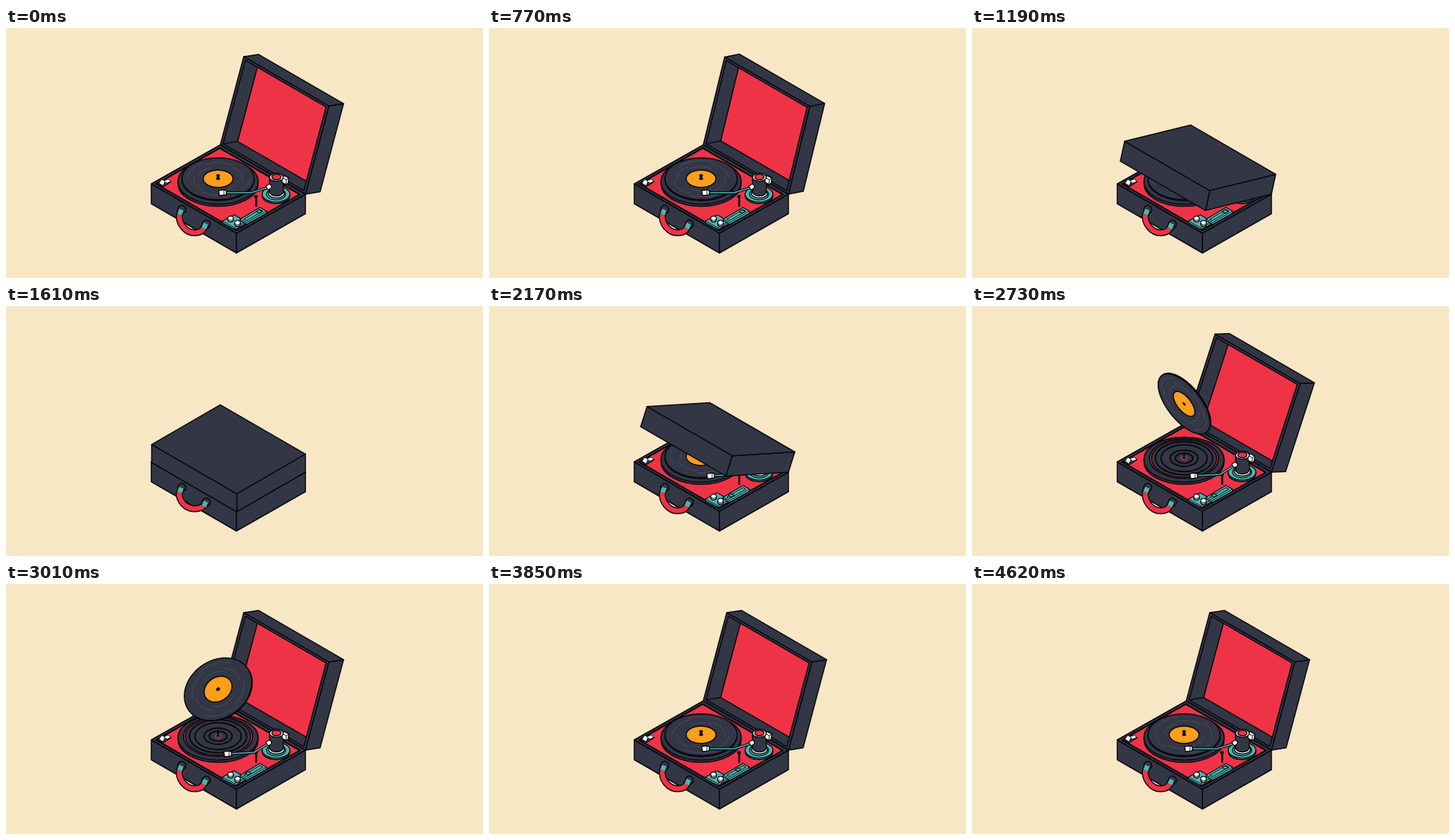
An HTML page with a canvas that plays this animation: 650x340 px, repeating every 4690 ms.

```html
<!DOCTYPE html>
<html lang="en">
<head>
<meta charset="utf-8">
<title>Record player</title>
<style>
html, body { margin: 0; width: 100%; height: 100%; overflow: hidden; background: #f8e7c5; }
canvas { display: block; }
</style>
</head>
<body>
<canvas id="stage" width="650" height="340"></canvas>
<script>
const ctx = document.getElementById('stage').getContext('2d');
const LOOP = 4690, STEP = 70, TAU = Math.PI * 2;
const BG = '#f8e7c5', DARK = '#333745', RED = '#ef3347', TEAL = '#4fb5ae',
      ORANGE = '#fb9f1c', INK = '#08080f', WHITE = '#fffdf8', GROOVE = '#555571';

const part = (t, a, b) => Math.min(1, Math.max(0, (t - a) / (b - a)));
const smooth = p => p * p * (3 - 2 * p);
const mix = (a, b, p) => a + (b - a) * p;
const add = (a, b, k = 1) => [a[0] + b[0] * k, a[1] + b[1] * k];

function paint(fill, width = 1.5, ink = INK) {
  if (fill) { ctx.fillStyle = fill; ctx.fill(); }
  if (width) { ctx.strokeStyle = ink; ctx.lineWidth = width; ctx.stroke(); }
}
function trace(points, close = true) {
  ctx.beginPath();
  points.forEach(p => ctx.lineTo(p[0], p[1]));
  if (close) ctx.closePath();
}
function poly(points, fill, width) { trace(points); paint(fill, width); }
function line(points, width, ink = INK) { trace(points, false); paint(null, width, ink); }
function oval(x, y, rx, ry, fill, width, ink) {
  ctx.beginPath();
  ctx.ellipse(x, y, rx, ry, 0, 0, TAU);
  paint(fill, width, ink);
}
function cylinder(x, top, bottom, rx, ry, fill) {
  ctx.beginPath();
  ctx.ellipse(x, top, rx, ry, 0, Math.PI, TAU);
  ctx.ellipse(x, bottom, rx, ry, 0, 0, Math.PI);
  ctx.closePath();
  paint(fill);
}

// Isometric case: u runs along the front-left side, v towards the hinge.
const U = [116, 67], V = [94, -53];
const at = (u, v, z = 0) => [198 + U[0] * u + V[0] * v, 212 + U[1] * u + V[1] * v - z];
const hinge = at(0, 1);

function lidAngle(t) {
  if (t < 1220) return 110 * (1 - part(t, 600, 1220) ** 3.17);
  if (t < 2113) {
    return 5 * Math.sin(Math.PI * part(t, 1220, 1450)) + 1.5 * Math.sin(Math.PI * part(t, 1450, 1600));
  }
  const p = part(t, 2113, 2450);
  return 125 * p * (1 + p - p * p) - 15 * smooth(part(t, 2450, 2900));
}

function drawLid(degrees) {
  const a = degrees * Math.PI / 180, c = Math.cos(a), s = Math.sin(a);
  const reach = [-93.5 * c, 54 * c - 108 * s];
  const depth = [21.3 * s, -12.3 * s - 24.6 * c];
  const spot = (u, r, d) => add(add(add(hinge, U, u), reach, r), depth, d);
  const sheet = (m, d) => [spot(m, m, d), spot(1 - m, m, d), spot(1 - m, 1 - m, d), spot(m, 1 - m, d)];
  poly([spot(1, 0, 0), spot(1, 1, 0), spot(1, 1, 1), spot(1, 0, 1)], DARK);
  poly([spot(0, 1, 0), spot(1, 1, 0), spot(1, 1, 1), spot(0, 1, 1)], DARK);
  if (degrees < 45) {
    poly(sheet(0, 1), DARK);
    return;
  }
  poly(sheet(0, 0), DARK);
  const opening = sheet(0.026, 0), panel = sheet(0.034, 0.93);
  ctx.save();
  trace(opening);
  ctx.clip();
  poly(panel, RED);
  line([opening[0], panel[0]], 1.5);
  ctx.restore();
  poly(opening, null);
}

function drawHandle(t) {
  const p = part(t, 1220, 1980);
  const sag = 1 - 0.2 * (1 - p) * Math.abs(Math.sin(p * Math.PI * 3));
  const y = v => 250 + (v - 250) * sag;
  oval(239.5, 247, 5.5, 5.8, DARK);
  oval(273, 267, 5.5, 5.8, DARK);
  ctx.beginPath();
  ctx.moveTo(236.5, 252);
  ctx.bezierCurveTo(234, y(266), 245, y(278.5), 257, y(278.5));
  ctx.bezierCurveTo(264, y(278.5), 268, y(276.5), 270.5, 270);
  paint(null, 9.4);
  paint(null, 6.6, RED);
  for (const [x, top, lean] of [[239, 247, -2.5], [272.5, 266, -3]]) {
    const tip = [x + lean, top + 6.5];
    line([[x, top], tip], 9.4);
    line([[x, top], tip], 6.6, TEAL);
  }
}

function drawCase(t) {
  poly([at(0, 0), at(1, 0), at(1, 0, -27), at(0, 0, -27)], DARK);
  poly([at(1, 0), at(1, 1), at(1, 1, -26.5), at(1, 0, -27)], DARK);
  poly([at(0, 0), at(1, 0), at(1, 1), at(0, 1)], DARK);
  poly([at(.03, .035), at(.97, .035), at(.97, .955), at(.03, .955)], RED, 2);
  drawHandle(t);
}

function drawControls(slide) {
  poly([[207, 211], [217, 205], [225, 209], [214, 216]], DARK, 1.2);
  poly([[208.5, 211], [212, 206], [217, 208], [214, 214.5]], WHITE, 0.8);
  poly([[215, 208], [221, 205.5], [224.5, 208.5], [219, 211]], WHITE, 0.8);

  poly([[295, 262.5], [311, 254], [327, 263.5], [327, 266], [312, 274], [295, 265]], TEAL, 1.2);
  line([[295, 262.5], [311.5, 271.5], [327, 263.5]], 0.9);
  line([[311.5, 271.5], [312, 274]], 0.9);
  for (const [x, y] of [[306, 258.8], [315.5, 264.7]]) {
    cylinder(x, y, y + 2, 3.7, 2.9, WHITE);
    oval(x, y, 3.7, 2.9, WHITE, 0.9);
  }

  poly([[319, 260], [346, 244], [355, 249], [355, 252], [328, 267], [319, 262]], TEAL, 1.2);
  line([[319, 260], [328, 264.5], [355, 249]], 0.9);
  poly([[324, 260], [346, 247], [350, 249], [328, 261.7]], TEAL, 1);
  const x = mix(330, 345, slide), y = mix(257.5, 249.5, slide);
  poly([[x - 4, y], [x, y - 2.5], [x + 4, y], [x, y + 2.5]], TEAL, 1.1);
}

function drawPlatter() {
  cylinder(289, 209, 212, 54.5, 30.5, DARK);
  oval(289, 209, 54.5, 30.5, DARK);
  oval(289, 207.5, 47, 27, RED);
  oval(289, 207.5, 44.5, 25.5, DARK);
  for (const r of [39, 31.5, 19, 12]) oval(289, 207, r, r * 0.577, DARK, 1.9);
  oval(289, 206.8, 4.5, 2.7, DARK, 1, RED);
  line([[289, 200], [289, 207]], 2.2);
}

function recordPose(t) {
  const rise = 1 - (1 - part(t, 2240, 2490)) ** 2;
  const turn = Math.PI * smooth(part(t, 2270, 3270));
  const played = Math.min(2130, (t - 3780 + LOOP) % LOOP);
  return { lift: 72 * rise * (1 - part(t, 2660, 3430) ** 2.5), turn, spin: TAU * played / 2130 };
}

function drawRecord({ lift, turn, spin }) {
  const c = Math.cos(turn), s = Math.sin(turn);
  const across = [0.707 * c, -0.408 * c + 0.816 * s];
  const side = c - s < 0 ? -1 : 1;
  const normal = [0.707 * s * side, (-0.816 * c - 0.408 * s) * side];
  const center = [289, 205 - lift];
  const arc = (r, from = 0, sweep = TAU, middle = center) => Array.from({ length: 61 }, (_, i) => {
    const a = from + sweep * i / 60;
    return [middle[0] + r * (0.707 * Math.cos(a) + across[0] * Math.sin(a)),
            middle[1] + r * (0.408 * Math.cos(a) + across[1] * Math.sin(a))];
  });
  poly(arc(49.2, 0, TAU, add(center, normal, -1.6)), INK);
  poly(arc(49.2), DARK);
  [28, 33, 38, 42.5].forEach((r, i) => {
    for (const half of [0, Math.PI]) line(arc(r, spin + half + i * 1.1, 1.1), 0.8, GROOVE);
  });
  poly(arc(20.3), ORANGE);
  poly(arc(2.6), INK, 0.5);
  if (lift < 5) {
    line([[289, 200.5], [289, 205]], 3.4);
    oval(289, 200.5, 2.3, 1.7, INK, 0.5);
  }
}

function drawArm(play) {
  oval(368, 228, 18.8, 10.8, TEAL);
  oval(368, 226, 18.8, 10.8, TEAL, 1.2);
  oval(368, 226, 13, 7.8, TEAL, 1.2);
  oval(368.5, 225, 11, 6.3, WHITE);
  cylinder(368.5, 203, 223, 9.3, 5.4, DARK);
  line([[341, 229], [341, 243]], 2.6);
  oval(340.5, 229, 2.4, 1.8, INK, 0.5);

  poly([[376, 203], [379, 200.5], [385.5, 204], [384.5, 211], [381.5, 213], [376, 210]], WHITE);
  line([[376, 203], [382, 206.5], [385.5, 204]], 1);
  line([[382, 206.5], [381.5, 213]], 1);
  oval(368.5, 203, 9.3, 5.4, WHITE);
  oval(368.5, 202.7, 6.2, 3.9, RED);

  const hop = 4 * Math.sin(Math.PI * play);
  const head = [mix(302, 295, play), mix(231, 224, play) - hop];
  const bend = [mix(338, 334, play), mix(229, 224, play) - hop / 2];
  const joint = [358.5, 216.5];
  for (const [w, ink] of [[3.8, INK], [1.5, TEAL]]) line([head, bend, joint], w, ink);
  poly([[354, 215], [359, 212], [362, 215], [361, 218], [357, 220]], WHITE, 1.2);
  const [x, y] = head;
  poly([[x - 5.5, y - 3], [x + 3, y - 4], [x + 5.5, y - 2], [x + 5, y + 3], [x - 4, y + 4]], WHITE);
  line([[x + 2, y - 3], [x + 2, y + 3]], 0.9);
}

function draw(t) {
  ctx.fillStyle = BG;
  ctx.fillRect(0, 0, 650, 340);
  ctx.lineJoin = 'round';
  const angle = lidAngle(t);
  // Arm and slider return to rest while the lid hides them.
  const playing = t < 1400;
  if (angle >= 45) drawLid(angle);
  drawCase(t);
  drawControls(playing ? 1 : smooth(part(t, 3640, 4000)));
  drawPlatter();
  drawRecord(recordPose(t));
  drawArm(playing ? 1 : smooth(part(t, 3430, 3780)));
  if (angle < 45) drawLid(angle);
}

const start = performance.now();
function tick() {
  const t = Math.max(0, performance.now() - start) % LOOP;
  draw(Math.floor(t / STEP) * STEP);
  requestAnimationFrame(tick);
}
tick();
</script>
</body>
</html>
```
